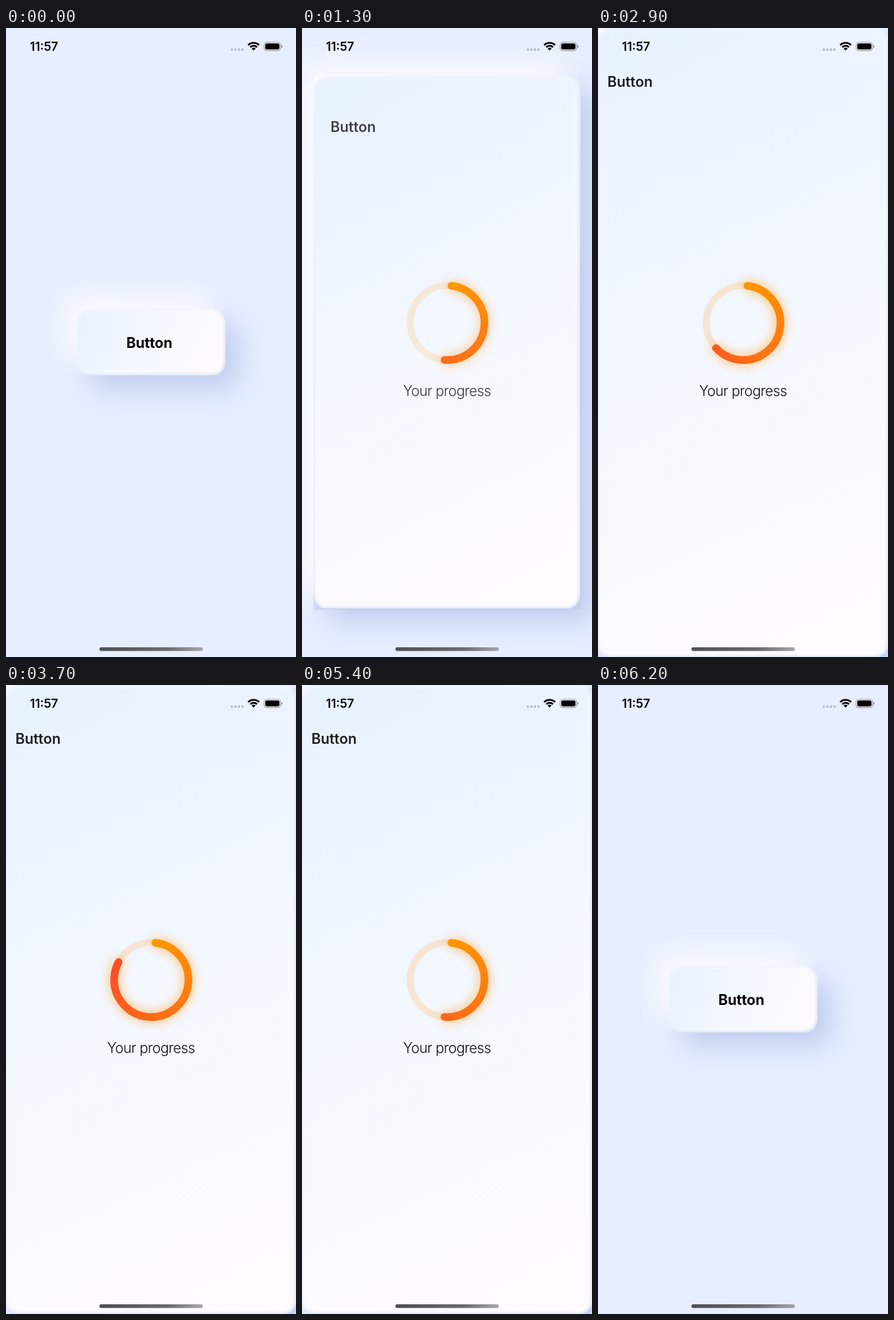
An HTML page with a canvas that plays this animation: 509x1101 px, repeating every 6.6 s.

```html
<!DOCTYPE html>
<html lang="en">
<head>
<meta charset="utf-8">
<title>Soft card</title>
<style>
html, body { margin: 0; width: 100%; height: 100%; overflow: hidden; background: #e7eeff; }
canvas { display: block; width: 509px; height: 1101px; }
</style>
</head>
<body>
<canvas id="stage" width="509" height="1101"></canvas>
<script>
const W = 509, H = 1101, LOOP = 6600, STEP = 100;
const ctx = document.getElementById('stage').getContext('2d');
const FONT = 'Inter, "Liberation Sans", sans-serif';
const RING = { x: 255, y: 516, r: 65.2, width: 13, from: 6.2, low: 184.4, high: 323.7 };

const mix = (a, b, k) => a + (b - a) * k;
const rad = deg => (deg - 90) * Math.PI / 180;

// Critically damped spring, settled after dur
function spring(t, start, rate, dur) {
  const s = t - start;
  if (s <= 0) return 0;
  if (s >= dur) return 1;
  const x = rate * s / 1000;
  return 1 - (1 + x) * Math.exp(-x);
}

const opened = t => spring(t, 1110, 16.8, 390) - spring(t, 5810, 16.8, 390);
const grow = (t, start) => spring(t, start, 14, 380);
const shrink = (t, start) => spring(t, start, 11.4, 468);
const filled = t => grow(t, 2820) - shrink(t, 3632) + grow(t, 4420) - shrink(t, 4932);

function gradient(x0, y0, x1, y1, ...stops) {
  const g = ctx.createLinearGradient(x0, y0, x1, y1);
  stops.forEach((c, i) => g.addColorStop(i / (stops.length - 1), c));
  return g;
}

function shadow(color, blur, dx = 0, dy = dx) {
  ctx.shadowColor = color;
  ctx.shadowBlur = blur;
  ctx.shadowOffsetX = dx;
  ctx.shadowOffsetY = dy;
}

function pill(x, y, w, h, r, fill) {
  ctx.beginPath();
  ctx.roundRect(x, y, w, h, r);
  ctx.fillStyle = fill;
  ctx.fill();
}

function text(str, x, y, weight, size, color, align = 'left', track = 0) {
  ctx.font = `${weight} ${size}px ${FONT}`;
  ctx.textAlign = align;
  ctx.letterSpacing = track + 'px';
  ctx.fillStyle = color;
  ctx.fillText(str, x, y);
  ctx.letterSpacing = '0px';
}

function inset(x, y, w, h, r, color, blur, dx, dy) {
  ctx.save();
  ctx.beginPath();
  ctx.roundRect(x, y, w, h, r);
  ctx.clip();
  ctx.beginPath();
  ctx.rect(x - 60, y - 60, w + 120, h + 120);
  ctx.roundRect(x, y, w, h, r);
  shadow(color, blur, dx, dy);
  ctx.fillStyle = '#fff';
  ctx.fill('evenodd');
  ctx.restore();
}

function card(p) {
  const x = mix(124.5, 0, p), y = mix(491.5, 0, p);
  const w = mix(384.5, W, p) - x, h = mix(608, H, p) - y, r = 23;

  ctx.save();
  shadow('#c0cdef', 48, 24);
  pill(x, y, w, h, r, '#eef4ff');
  shadow('rgba(252,252,255,0.95)', 48, -24);
  ctx.beginPath();
  ctx.rect(0, 0, W, H);
  ctx.roundRect(x, y, w, h, r);
  ctx.clip('evenodd');
  // keep the light shadow off the lower right side
  ctx.beginPath();
  ctx.moveTo(0, 0);
  ctx.lineTo(W, 0);
  ctx.lineTo(x + w, y);
  ctx.lineTo(x, y + h);
  ctx.lineTo(0, H);
  ctx.clip();
  pill(x, y, w, h, r, '#eef4ff');
  ctx.restore();

  if (p > 0 && p < 1) {
    ctx.fillStyle = gradient(x, y, x + w, y + h,
      'rgba(255,255,255,0.6)', 'rgba(190,204,236,0.6)', 'rgba(190,204,236,0.6)');
    ctx.fillRect(x - 1, y - 1, w + 3.5, h + 3);
  }

  pill(x, y, w, h, r, gradient(x, y, x + w, y + h, '#e8f1ff', '#f4f8ff', '#fffbfe'));
  inset(x, y, w, h, r, 'rgba(255,255,255,0.8)', 12, -4, -4);
  inset(x, y, w, h, r, 'rgba(255,255,255,0.75)', 5, 1, 3);
  inset(x, y, w, h, r, 'rgba(186,202,242,0.7)', 6, -1, -1);
}

function arc(a, b, color, cap) {
  ctx.beginPath();
  ctx.arc(RING.x, RING.y, RING.r, rad(a), rad(b));
  ctx.lineWidth = RING.width;
  ctx.lineCap = cap;
  ctx.strokeStyle = color;
  ctx.stroke();
}

function progress(alpha, k) {
  if (alpha <= 0) return;
  const end = mix(RING.low, RING.high, k);
  const hue = ctx.createConicGradient(-Math.PI / 2, RING.x, RING.y);
  hue.addColorStop(0, '#ff9800');
  hue.addColorStop(1, '#ff3b30');
  ctx.save();
  ctx.globalAlpha = alpha;
  arc(0, 360, 'rgba(255,165,50,0.1)', 'butt');
  ctx.lineWidth = RING.width - 2;
  ctx.strokeStyle = 'rgba(255,165,50,0.13)';
  ctx.stroke();
  shadow('rgba(255,155,20,0.75)', 20);
  arc(RING.from, end, hue, 'round');
  shadow('transparent', 0);
  arc(RING.from, end, hue, 'round');
  text('Your progress', 254.5, 643.5, 300, 25, '#101116', 'center', -0.65);
  ctx.restore();
}

function title(p) {
  const x = mix(211.2, 16.4, p), y = mix(560, 103.3, p);
  const open = p > 0.5;
  ctx.globalAlpha = open ? p : 1 - p;
  text('Button', x, y, open ? 600 : 700, 25, open ? '#1c1d22' : '#000');
  ctx.globalAlpha = 1;
}

function statusBar() {
  text('11:57', 42, 40, 600, 21, '#000');
  for (let i = 0; i < 4; i++) pill(394.4 + i * 6.2, 35.8, 4.1, 4.1, 1.2, '#b9bfcf');

  const cx = 434.6, cy = 39.6;
  ctx.strokeStyle = '#000';
  ctx.lineCap = 'butt';
  ctx.lineWidth = 3.2;
  for (const r of [8.4, 13.6]) {
    ctx.beginPath();
    ctx.arc(cx, cy, r, rad(-45), rad(45));
    ctx.stroke();
  }
  ctx.beginPath();
  ctx.moveTo(cx, cy);
  ctx.arc(cx, cy, 5, rad(-45), rad(45));
  ctx.fillStyle = '#000';
  ctx.fill();

  ctx.beginPath();
  ctx.roundRect(453, 25, 29, 14.6, 4.6);
  ctx.lineWidth = 1.2;
  ctx.strokeStyle = 'rgba(0,0,0,0.4)';
  ctx.stroke();
  pill(455, 27, 25, 10.6, 3, '#000');
  pill(483.4, 30, 1.7, 4.8, [0, 2, 2, 0], 'rgba(0,0,0,0.45)');
}

function draw(now) {
  const t = Math.floor((now % LOOP) / STEP) * STEP;
  const p = Math.max(0, Math.min(1, opened(t)));
  ctx.fillStyle = '#e7eeff';
  ctx.fillRect(0, 0, W, H);
  card(p);
  progress(p, filled(t));
  title(p);
  statusBar();
  pill(164, 1084, 181.5, 6.4, 3.2, gradient(164, 0, 345, 0, '#505157', '#5c5d63', '#6b6c72', '#a6a7ac'));
}

function loop() {
  draw(performance.now());
  requestAnimationFrame(loop);
}
loop();
</script>
</body>
</html>
```
